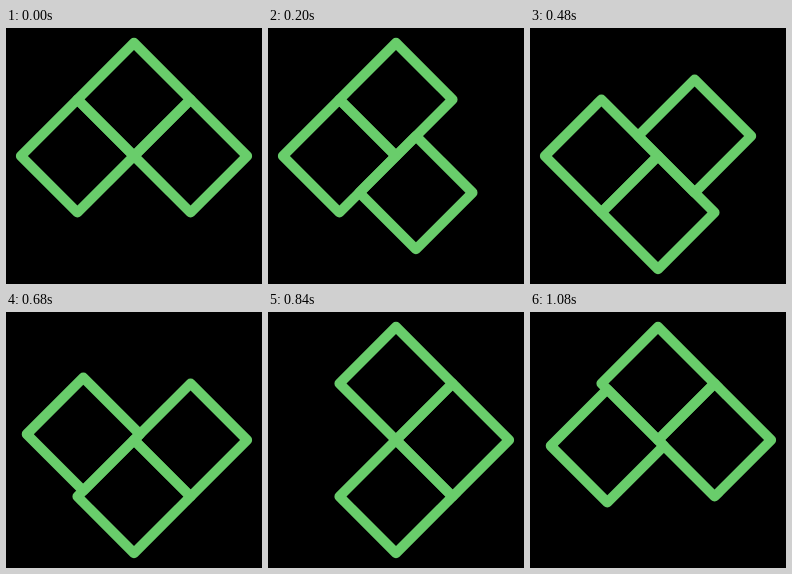
These frames come from a looping animation (256 px wide and 256 px high, 1.12 s). An HTML page without scripts:

```html
<!DOCTYPE html>
<html lang="en">
<head>
<meta charset="utf-8">
<title>Sliding squares</title>
<style>
  html, body { margin: 0; width: 100%; height: 100%; overflow: hidden; background: #000; }
  svg { display: block; width: 100vw; height: 100vh; }

  .tile {
    x: 0;
    y: 0;
    width: 80px;
    height: 80px;
    fill: none;
    stroke: #69cd6b;
    stroke-width: 10;
    stroke-linejoin: round;
    animation: 1120ms step-end infinite;
  }

  /* The grid is turned by 45 degrees: x runs down right, y runs down left.
     Each slide eases in and out over five 40 ms ticks, one tile at a time. */
  .first { animation-name: first; }
  .second { animation-name: second; }
  .third { animation-name: third; }

  /* right to bottom, then bottom to left */
  @keyframes first {
    0% { x: 80px; y: 0; }
    10.714% { x: 80px; y: 8.3px; }
    14.285% { x: 80px; y: 28.2px; }
    17.857% { x: 80px; y: 51.8px; }
    21.428% { x: 80px; y: 71.7px; }
    25% { x: 80px; y: 80px; }
    85.714% { x: 71.7px; y: 80px; }
    89.285% { x: 51.8px; y: 80px; }
    92.857% { x: 28.2px; y: 80px; }
    96.428%, 100% { x: 8.3px; y: 80px; }
  }

  /* top to right */
  @keyframes second {
    0% { x: 0; }
    35.714% { x: 8.3px; }
    39.285% { x: 28.2px; }
    42.857% { x: 51.8px; }
    46.428% { x: 71.7px; }
    50%, 100% { x: 80px; }
  }

  /* left to top */
  @keyframes third {
    0% { y: 80px; }
    60.714% { y: 71.7px; }
    64.285% { y: 51.8px; }
    67.857% { y: 28.2px; }
    71.428% { y: 8.3px; }
    75%, 100% { y: 0; }
  }
</style>
</head>
<body>
<svg viewBox="0 0 256 256">
  <g transform="translate(128 128) rotate(45) translate(-80 -80)">
    <rect class="tile first"/>
    <rect class="tile second"/>
    <rect class="tile third"/>
  </g>
</svg>
</body>
</html>
```
